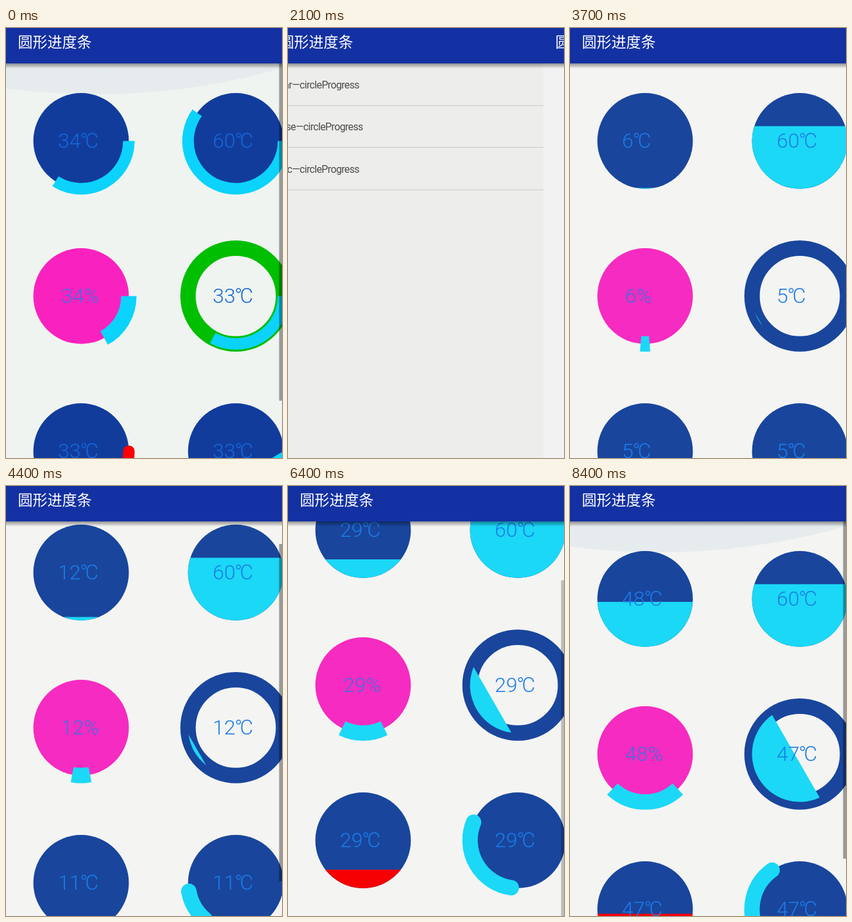
An HTML page that plays this animation: 430x668 px, repeating every 8.5 s.

```html
<!DOCTYPE html>
<html lang="zh">
<head>
<meta charset="utf-8">
<title>圆形进度条</title>
<style>
  html, body { margin: 0; width: 100%; height: 100%; overflow: hidden; background: #f2f2f2; }
  svg { display: block; width: 430px; height: 668px; overflow: hidden; }
  .bar  { --bg: #f2f2f2; --blue: #18449b; --cyan: #18d3f2; --pink: #f22abf; --ink: #1c78e4; }
  .bar.calm { --bg: #eff4f1; --blue: #123c9c; --cyan: #0cd3fb; --pink: #fa22bf; --ink: #1468da; }
  .list { --bg: #ededec; }
  .rise { --bg: #f4f4f3; --blue: #19459c; --cyan: #1bd8f6; --pink: #f62bc1; --ink: #1c7ce8; }
  .rise.opening { --bg: #ededec; }
  .title { font: 300 23px "Noto Sans CJK SC", "Noto Sans CJK", sans-serif; fill: #fff; }
  .row { font: 16px Roboto, sans-serif; letter-spacing: -.65px; fill: #4c4c4c; }
  .value { font: 300 32px Roboto, "Noto Sans CJK SC", "Noto Sans CJK", sans-serif; }
</style>
</head>
<body>
<svg id="stage" viewBox="0 0 430 668">
  <defs>
    <linearGradient id="shade" x1="0" y1="0" x2="0" y2="1">
      <stop offset="0" stop-color="#000" stop-opacity=".4"/>
      <stop offset=".5" stop-color="#000" stop-opacity=".2"/>
      <stop offset="1" stop-color="#000" stop-opacity="0"/>
    </linearGradient>
  </defs>
</svg>
<script>
const LOOP = 8500, STEP = 100, W = 430, H = 668, R = 74.4;
const stage = document.getElementById('stage');

function add(parent, tag, attrs = {}, text) {
  const el = document.createElementNS('http://www.w3.org/2000/svg', tag);
  for (const k in attrs) el.setAttribute(k, attrs[k]);
  if (text) el.textContent = text;
  parent.append(el);
  return el;
}

// Linear interpolation through [time, value] keys, clamped at both ends
function track(keys, t) {
  if (t <= keys[0][0]) return keys[0][1];
  for (let i = 1; i < keys.length; i++) {
    const [t0, v0] = keys[i - 1], [t1, v1] = keys[i];
    if (t <= t1) return v0 + (v1 - v0) * (t - t0) / (t1 - t0);
  }
  return keys[keys.length - 1][1];
}

function ease(t, start, length) {
  const u = Math.min(1, Math.max(0, (t - start) / length));
  return u * u * (3 - 2 * u);
}

function arc(cx, cy, from, to) {
  const point = deg => {
    const a = deg * Math.PI / 180;
    return (cx + R * Math.cos(a)).toFixed(2) + ' ' + (cy + R * Math.sin(a)).toFixed(2);
  };
  return `M${point(from)}A${R} ${R} 0 ${to - from > 180 ? 1 : 0} 1 ${point(to)}`;
}

function makePage(name) {
  const root = add(stage, 'g', { class: name });
  add(root, 'rect', { width: W, height: H, fill: 'var(--bg)' });
  const body = add(root, 'g');
  add(root, 'rect', { y: 55, width: W, height: 8, fill: 'url(#shade)' });
  add(root, 'rect', { width: W, height: 55, fill: '#1431a3' });
  add(root, 'text', { class: 'title', x: 18.5, y: 30 }, '圆形进度条');
  return { root, body };
}

// mid: centre angle of the sweep, or null when it starts at 0 degrees
function makeDial(parent, index, o) {
  const cx = index % 2 ? 358 : 117, cy = 175.4 + 241 * (index >> 1);
  add(parent, 'circle', o.ring
    ? { cx, cy, r: R, fill: 'none', stroke: o.ring, 'stroke-width': 24 }
    : { cx, cy, r: R, fill: o.disc || 'var(--blue)' });
  const color = o.color || 'var(--cyan)';
  const path = add(parent, 'path', o.width
    ? { fill: 'none', stroke: color, 'stroke-width': o.width, 'stroke-linecap': o.cap || 'butt' }
    : { fill: color });
  const label = add(parent, 'text', {
    class: 'value', x: cx - (o.percent ? 31 : 36), y: cy + 10.6,
    fill: o.percent ? '#416fdb' : 'var(--ink)'
  });
  return base => {
    const v = o.fixed || Math.max(0, Math.floor(base - o.lag));
    const sweep = v * (o.percent ? 1.8 : 3.6);
    const from = o.mid == null ? 0 : o.mid - sweep / 2;
    path.setAttribute('d', v ? arc(cx, cy, from, from + sweep) + (o.width ? '' : 'Z') : '');
    label.textContent = v + (o.percent ? '%' : '℃');
  };
}

function makeDialPage(name, specs) {
  const page = makePage(name);
  page.glow = add(page.body, 'circle', { cx: 140, r: 1060, fill: '#e6ecee' });
  page.content = add(page.body, 'g');
  page.dials = specs.map((o, i) => makeDial(page.content, i, o));
  page.thumb = add(page.body, 'rect', { x: 425.5, width: 4.5, height: 524, fill: '#000' });
  return page;
}

function drawDialPage(page, base, scroll, glow, thumb) {
  page.dials.forEach(draw => draw(base));
  page.content.setAttribute('transform', `translate(0 ${-scroll})`);
  page.glow.setAttribute('cy', 55 + 48 * glow - 1060);
  page.glow.setAttribute('opacity', glow);
  page.thumb.setAttribute('y', 55 + scroll * 0.854);
  page.thumb.setAttribute('opacity', thumb);
}

function place(page, x) {
  page.root.setAttribute('transform', `translate(${Math.round(x)} 0)`);
}

const list = makePage('list');
['Bar', 'Rise', 'Arc'].forEach((word, i) => {
  const y = 120.5 + 65.3 * i;
  add(list.body, 'text', { class: 'row', x: 16, y: y - 26.5 }, word + '—circleProgress');
  add(list.body, 'rect', { y: Math.round(y - 0.5), width: W, height: 1, fill: '#c9c9c8' });
});

const bar = makeDialPage('bar', [
  { width: 18, lag: 0 },
  { width: 18, fixed: 60 },
  { width: 24, lag: 0.1, disc: 'var(--pink)', percent: true },
  { width: 18, lag: 0.2, ring: '#00be00' },
  { width: 18, lag: 0.3, color: '#fa0006', cap: 'round' },
  { lag: 0.3 }
]);

const rise = makeDialPage('rise', [
  { mid: 90, lag: 0 },
  { mid: 90, fixed: 60 },
  { mid: 90, width: 24, lag: 0.1, disc: 'var(--pink)', percent: true },
  { mid: 150, lag: 0.2, ring: 'var(--blue)' },
  { mid: 90, lag: 0.3, color: '#f60004' },
  { mid: 150, width: 24, lag: 0.3, cap: 'round' }
]);

const barCount = [[700, 34.15], [1600, 41.25], [2200, 46.5]];
const barFade = [[700, 1], [1200, 0]];
const riseCount = [[3000, 0], [4400, 12.25], [6400, 29.65], [7200, 37.05], [8400, 48.15]];
const riseScroll = [[4200, 0], [4400, 41], [4700, 107], [6900, 107], [7200, 26], [7400, 0]];
const riseGlow = [[7400, 0], [7700, 1]];
const riseThumb = [[4200, 0], [4300, 0.37], [6300, 0.37], [6400, 0.23], [6600, 0], [6900, 0], [7000, 0.37]];

function draw(time) {
  const t = Math.floor((time % LOOP) / STEP) * STEP;
  const back = ease(t, 1750, 420), open = ease(t, 2950, 420);
  place(bar, W * back);
  place(list, W * (back - 1 - open));
  place(rise, W * (1 - open));
  bar.root.classList.toggle('calm', t < 800);
  rise.root.classList.toggle('opening', open < 1);
  const fade = track(barFade, t);
  drawDialPage(bar, track(barCount, t), 0, fade, 0.37 * fade);
  drawDialPage(rise, track(riseCount, t), track(riseScroll, t), track(riseGlow, t), track(riseThumb, t));
}

const start = performance.now();
function tick() {
  draw(performance.now() - start);
  requestAnimationFrame(tick);
}
tick();
</script>
</body>
</html>
```
